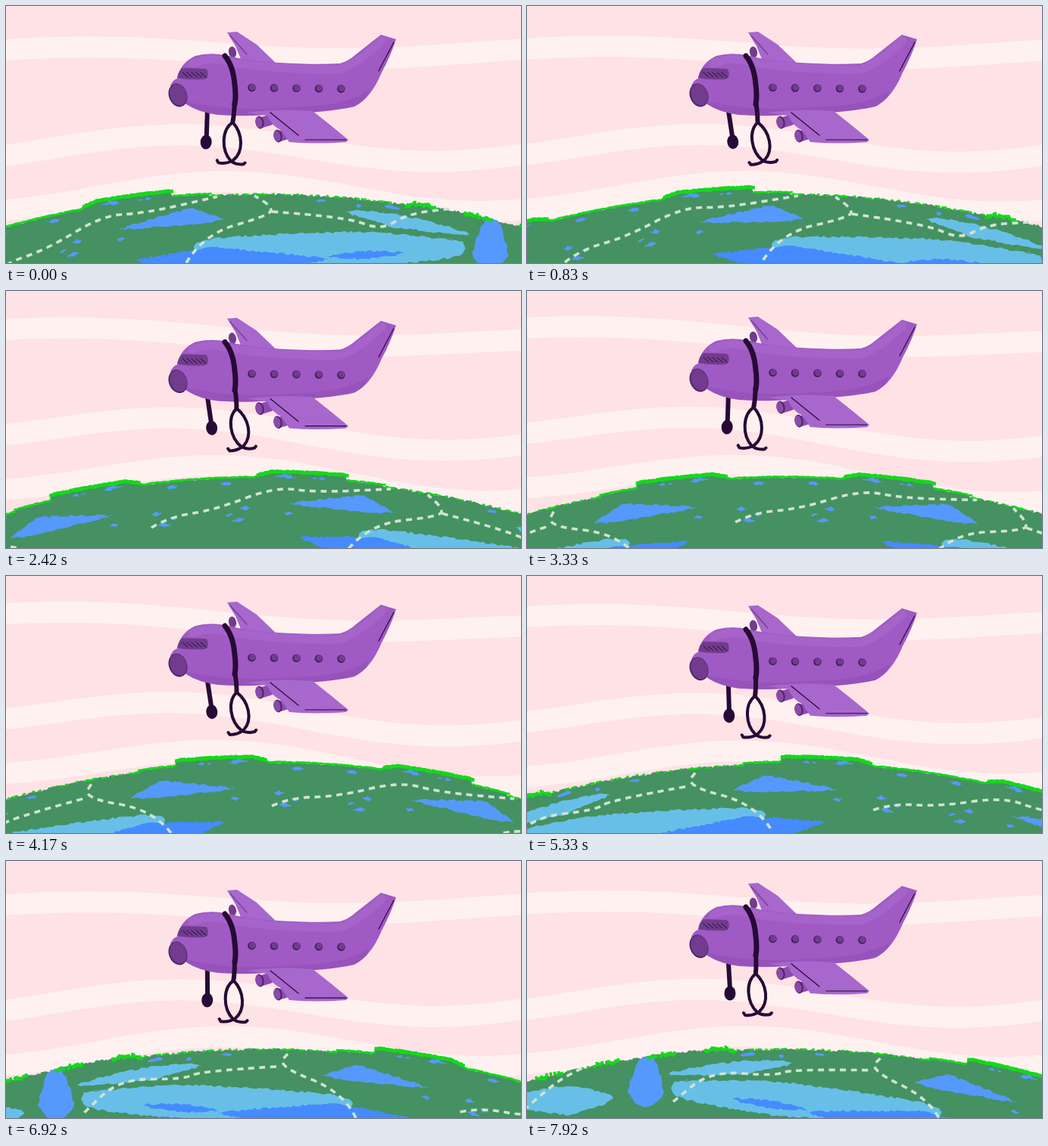
Animation, 680 px wide and 340 px high, one loop 8 s. Source, as an HTML page with a canvas:

```html
<!DOCTYPE html>
<html lang="en">
<head>
<meta charset="utf-8">
<title>Plane over the globe</title>
<style>
html, body { margin: 0; width: 100%; height: 100%; overflow: hidden; background: #fee2e5; }
canvas { display: block; width: 680px; height: 340px; }
</style>
</head>
<body>
<canvas id="stage" width="680" height="340"></canvas>
<script>
const ctx = document.getElementById('stage').getContext('2d');
const LOOP = 8000, STEPS_PER_BOB = 20;
const CX = 340, CY = 1523, RAD = Math.PI / 180;
const SPIN = 0.357 * RAD;   // globe turn per step
const AXIS = -14.2 * RAD;   // the land is mirrored around this angle
const BLUE = '#5599fc', DEEP = '#458bff', LIGHT = '#67bfe8';
const LAND = '#459161', LIME = '#14d81b', ROAD = '#d0e4cf';
const INK = '#270a35', PURPLE = '#a05ac4', PALE = '#a767cc', PLUM = '#713c8d', DUSK = '#4c2262';

let seed = 7;
const rand = () => (seed = (seed * 16807) % 2147483647) / 2147483647;
const between = (a, b) => a + (b - a) * rand();
const wobble = amp => between(-amp, amp);

function polygon(points) {
  const path = new Path2D();
  points.forEach(p => path.lineTo(...p));
  path.closePath();
  return path;
}

// Smooth open line through the midpoints
function smooth(points) {
  const path = new Path2D();
  path.moveTo(...points[0]);
  for (let k = 1; k < points.length - 1; k++) {
    const [x, y] = points[k], [u, v] = points[k + 1];
    path.quadraticCurveTo(x, y, (x + u) / 2, (y + v) / 2);
  }
  path.lineTo(...points[points.length - 1]);
  return path;
}

// Globe coordinates: d degrees from the mirror axis, r from the centre
function polar(d, r) {
  const a = AXIS + d * RAD;
  return [r * Math.sin(a), -r * Math.cos(a)];
}

// A stage point as it stands at a given step
function onGlobe(step, x, y, side = 1) {
  const a = Math.atan2(x - CX, CY - y) - step * SPIN - AXIS;
  return polar(side * a / RAD, Math.hypot(x - CX, y - CY));
}

// The coast stands higher on a ridge beside the axis
function surface(d) {
  d = Math.abs(d);
  if (d > 3.4 && d < 8.8) return 1277 + 7 * Math.min(1, (d - 3) / 1.2);
  return d > 11 && d < 23 ? 1274 : 1277;
}

// Chalk stroke between two points, widest at the share `peak`
function brush([x, y], [u, v], up, down, peak = 0.5, blunt = 0.6) {
  const length = Math.hypot(u - x, v - y), nx = (v - y) / length, ny = (x - u) / length;
  const n = Math.ceil(length / 4), top = [], bottom = [];
  for (let k = 0; k <= n; k++) {
    const s = k / n, size = Math.pow(s < peak ? s / peak : (1 - s) / (1 - peak), blunt);
    const point = h => [x + (u - x) * s + nx * h, y + (v - y) * s + ny * h];
    top.push(point(up * size + wobble(1.4)));
    bottom.unshift(point(-down * size + wobble(1.4)));
  }
  return polygon(top.concat(bottom));
}

function lake(color, step, x, y, u, v, shape, side) {
  return [color, brush(onGlobe(step, x, y, side), onGlobe(step, u, v, side), ...shape)];
}

function specks(count, from, to, deepest) {
  return Array.from({ length: count }, () => {
    const d = between(from, to), r = surface(d) - between(5, deepest);
    return [BLUE, brush(polar(d, r), polar(d + between(0.3, 0.8), r + wobble(2)), 2.5, 2)];
  });
}

// Bright chalk along the coast: solid near the axis, then sparse, then in clumps
function fringe() {
  const path = new Path2D();
  for (let d = 0; d < 35; d += 0.08) {
    const ridge = d > 3.4 && d < 8.8, far = d > 22;
    const clump = far && Math.sin((d - 22.6) / 3.45 * 2 * Math.PI) > 0;
    const chance = d < 11.5 ? 1 : clump ? 0.7 : far ? 0.06 : 0.2;
    if (rand() > chance) continue;
    const half = ridge ? 2.3 : clump ? 2.4 : 1.2, r = surface(d) + wobble(clump ? 2 : 0.7);
    const corners = [[0, half], [0.16, half], [0.16, -half], [0, -half]];
    path.addPath(polygon(corners.map(([e, h]) => polar(d + e, r + h))));
  }
  return path;
}

const land = (() => {
  const edge = [];
  for (let d = -42; d <= 38; d += 0.1) edge.push(polar(d, surface(d) + wobble(1.5)));
  return polygon([...edge, polar(38, 1000), polar(-42, 1000)]);
})();

const halfWorld = [
  lake(BLUE, 10, 226, 286, 364, 282, [20, 3, 0.72, 0.9]),
  lake(LIGHT, 0, 248, 319, 607, 320, [21, 24, 0.6, 0.3]),
  lake(LIGHT, 0, 450, 272, 612, 302, [9, 9, 0.4]),
  lake(LAND, 0, 475, 292, 600, 311, [2, 2]),
  lake(DEEP, 0, 172, 337, 425, 335, [17, 20, 0.4, 0.8]),
  lake(DEEP, 0, 425, 331, 525, 327, [5, 6]),
  lake(BLUE, 95, 160, 257, 155, 326, [24, 24, 0.7, 0.45], -1),
  lake(LIGHT, 95, -40, 318, 114, 313, [21, 18, 0.6], -1),
  ...specks(5, 3.6, 8, 9),
  ...specks(4, 16, 31, 12),
  ...specks(6, 0.5, 7, 60),
  [LIME, fringe()]
];

const road = (step, ...points) => smooth(points.map(([x, y]) => onGlobe(step, x, y)));
const roads = [
  road(10, [50, 339], [72, 322], [130, 306], [206, 266], [260, 267], [358, 251]),
  road(0, [238, 340], [260, 302], [351, 276], [349, 264], [328, 251]),
  road(0, [351, 272], [450, 279], [495, 297], [530, 275], [588, 268]),
  road(83, [462, 340], [445, 305], [357, 271], [376, 251]),
  road(83, [357, 272], [255, 278], [235, 289], [150, 288], [100, 336]),
  road(95, [-25, 350], [28, 298], [76, 272])
];

function cloud(base, lift, crest) {
  const points = [];
  for (let x = -40; x <= 720; x += 40) {
    points.push([x, base - lift * Math.cos((x - crest) / 335 * Math.PI)]);
  }
  return smooth(points);
}
const clouds = [cloud(62, 8, 110), cloud(188, 18, 230), cloud(252, 20, 290)];

// Draws in a frame turned around a point
function turned(x, y, angle, draw) {
  ctx.save();
  ctx.translate(x, y);
  ctx.rotate(angle);
  ctx.translate(-x, -y);
  draw();
  ctx.restore();
}

function drawSky(step) {
  ctx.fillStyle = '#fee2e5';
  ctx.fillRect(0, 0, 680, 340);
  const tilt = 0.8 * RAD * (1 - Math.cos(step / 84 * 2 * Math.PI));
  turned(340, 170, tilt, () => {
    ctx.strokeStyle = '#fef1f0';
    ctx.lineWidth = 28;
    clouds.forEach(path => ctx.stroke(path));
  });
}

function fillAll(shapes) {
  for (const [color, path] of shapes) {
    ctx.fillStyle = color;
    ctx.fill(path);
  }
}

function drawGlobe(step) {
  ctx.save();
  ctx.translate(CX, CY);
  ctx.rotate(step * SPIN);
  fillAll([[LAND, land], ...halfWorld]);
  ctx.save();
  ctx.rotate(AXIS);
  ctx.scale(-1, 1);
  ctx.rotate(-AXIS);
  fillAll(halfWorld);
  ctx.restore();
  ctx.strokeStyle = ROAD;
  ctx.lineWidth = 3.6;
  ctx.setLineDash([8, 6.5]);
  roads.forEach(path => ctx.stroke(path));
  ctx.restore();
}

const body = new Path2D('M217 105Q221 97 226 96Q230 75 250 66Q268 61 290 65Q320 73 360 75Q410 78 441 76' +
  'Q452 73 462 64L495 38L515 44Q508 66 496 88Q482 122 460 133Q425 141 370 142Q320 147 280 144Q255 141 238 130Z');
const backWing = new Path2D('M292 35L305 34L331 51L358 77L312 75L303 53Z');
const frontWing = new Path2D('M318 141Q360 135 405 139Q428 157 452 177L449 180Q410 183 374 180L364 165Q350 158 345 145Z');
const shade = new Path2D('M236 126Q300 141 380 134Q450 132 478 112L470 150L230 150Z');

function ellipse(x, y, rx, ry, fill, tilt = 0) {
  ctx.beginPath();
  ctx.ellipse(x, y, rx, ry, tilt, 0, 7);
  ctx.fillStyle = fill;
  ctx.fill();
}

function line(d, width, color = INK) {
  ctx.lineWidth = width;
  ctx.strokeStyle = color;
  ctx.stroke(new Path2D(d));
}

function engine(x, y) {
  line(`M${x + 3} ${y}L${x + 13} ${y - 3}`, 14, '#8d4cad');
  ellipse(x, y, 5.5, 8.5, DUSK, -0.2);
  ellipse(x - 1, y, 4.5, 7.5, '#8a4aaa', -0.2);
}

function drawPlane(step) {
  const phase = step / STEPS_PER_BOB * 2 * Math.PI;
  const swing = 5.2 * RAD * Math.cos(phase);
  ctx.save();
  ctx.translate(0, 5 * Math.sin(phase));
  ctx.lineCap = ctx.lineJoin = 'round';

  fillAll([[PALE, backWing]]);
  line('M296 39L318 64', 1.2, PLUM);
  ellipse(299, 61, 5, 7.5, PLUM, -0.2);

  turned(266, 138, swing, () => {
    line('M266 140L268 174', 6);
    ellipse(268, 180, 7.5, 9.5, INK);
  });

  fillAll([[PURPLE, body]]);
  ctx.save();
  ctx.clip(body);
  fillAll([['rgba(112,50,145,.18)', shade]]);
  line('M246 76Q270 66 295 74Q350 84 440 84Q462 78 496 46', 11, 'rgba(185,125,218,.25)');
  ctx.restore();
  line('M512 48L492 86', 1.2);

  fillAll([[PLUM, new Path2D('M226 95Q228 85 233 82L264 83Q268 86 266 95L262 97Q240 98 226 95Z')]]);
  for (let x = 233; x < 262; x += 6) line(`M${x} 88L${x + 7} 94`, 1);
  ellipse(227, 118, 12, 15.8, DUSK, -0.35);
  ellipse(227.5, 117.5, 10.8, 14.6, PLUM, -0.35);

  for (let k = 0; k < 5; k++) {
    const x = 324.5 + 29.5 * k, y = 108 + k * 0.4;
    ellipse(x, y, 5.3, 5.3, '#42205a');
    ellipse(x + 0.6, y - 0.6, 4.2, 4.2, PLUM);
  }

  engine(335, 154);
  engine(359, 172);
  fillAll([[PALE, frontWing]]);
  line('M349 141L386 171', 1.2);
  line('M395 177L449 177', 1.2);

  turned(302, 125, swing, () => {
    line('M302 128Q303 142 302 153', 6);
    line('M302 154C288 165 290 192 304 205Q311 210 321 208L323 206', 4);
    line('M302 154C317 168 320 192 307 204Q299 210 288 209L286 206', 4);
  });
  line('M289 66Q300 79 302 104Q304 120 302 130', 7);
  ctx.restore();
}

// Twelve steps a second, each starting on a whole hundredth
function stepAt(time) {
  const step = Math.round(time * 0.012);
  return Math.round(step * 25 / 3) * 10 > time ? step - 1 : step;
}

let shown = -1;
const start = performance.now();
function tick() {
  const step = stepAt((performance.now() - start) % LOOP);
  if (step !== shown) {
    shown = step;
    drawSky(step);
    drawGlobe(step);
    drawPlane(step);
  }
  requestAnimationFrame(tick);
}
tick();
</script>
</body>
</html>
```
